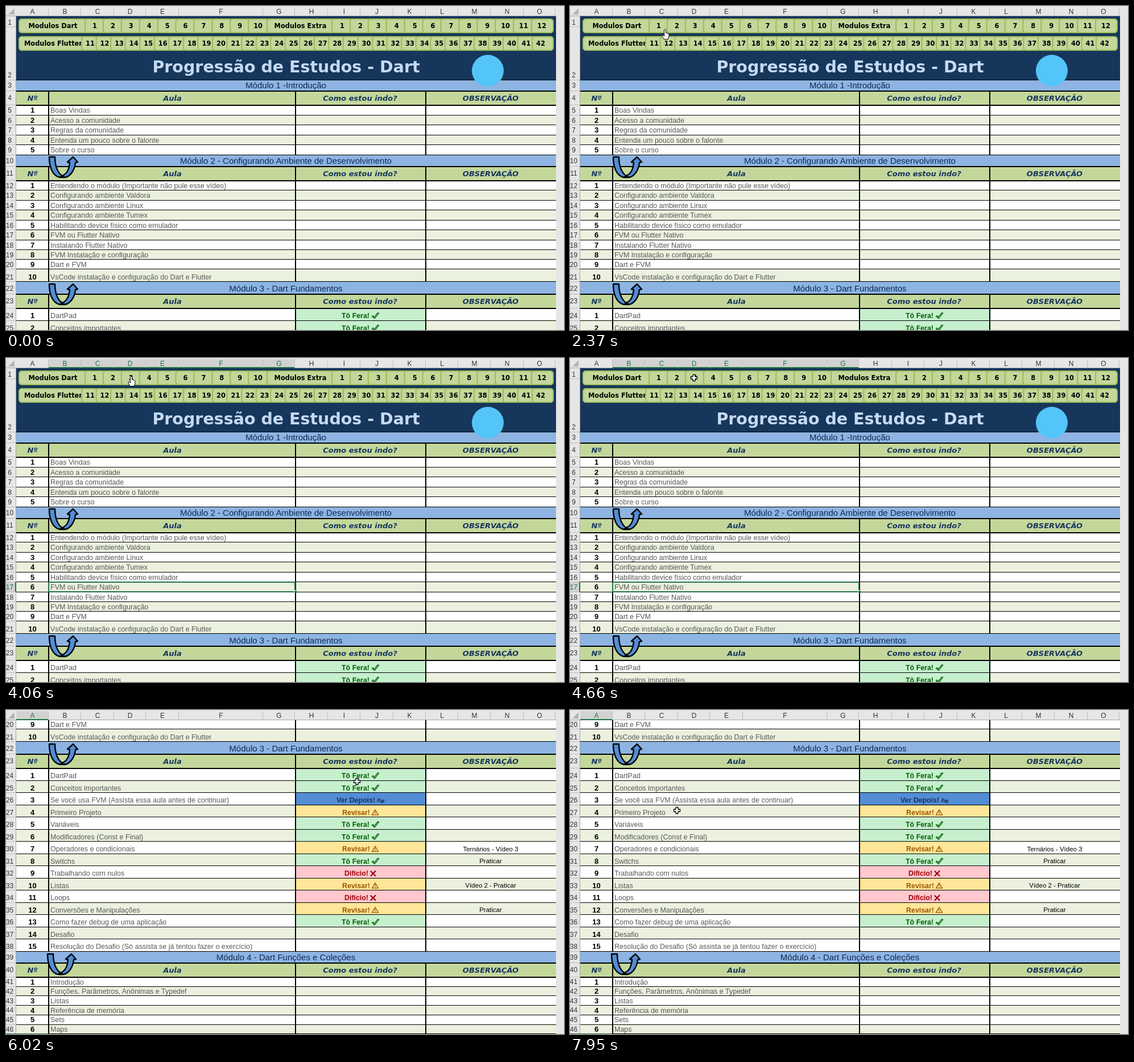
An HTML page for the animation above (8 s loop, 981 by 571 pixels).

```html
<!DOCTYPE html>
<html lang="pt-BR">
<head>
<meta charset="utf-8">
<style>
  html, body { margin: 0; width: 100%; height: 100%; overflow: hidden; background: #e6e6e6; }
  svg { display: block; }
  rect, line { shape-rendering: crispEdges; }
  text { font-family: "Liberation Sans", Arial, sans-serif; white-space: pre; }
  .mid { text-anchor: middle; }
  .label { font-size: 12px; fill: #333; }
  .on { fill: #217346; }
  .lesson { font-size: 12.5px; fill: #595959; }
  .num { font-size: 13px; font-weight: bold; }
  .note { font-size: 11.5px; }
  .module { font-size: 15px; fill: #0f2a52; }
  .head { font: italic bold 13px "DejaVu Sans", sans-serif; fill: #17365d; }
  .status { font-size: 12.4px; font-weight: bold; }
  .title { font: bold 28.5px "DejaVu Sans", sans-serif; fill: #c5d9f1; }
  .nav { font: bold 11.4px "DejaVu Sans", sans-serif; }
  .btn { fill: #c4d79b; stroke: #9bbb59; stroke-width: 2; shape-rendering: auto; }
</style>
</head>
<body>
<svg id="stage" width="981" height="571" viewBox="0 0 981 571"></svg>
<script>
const LEFT = 18, RIGHT = 967, SCROLL = 430, LOOP = 8000;
const COLS = [18, 75, 132, 190, 246, 304, 452, 508, 566, 623, 681, 738, 795, 852, 910, 966];

// Status: label, background, ink, label centre, icon x, icon path
const STATUS = {
  ok: ["Tô Fera!", "#c6efce", "#006100", 614.5, 643, "M.5 1L2.5 0L4.5 2.5L10.5-5L12.5-4.5L5 5z"],
  later: ["Ver Depois!", "#538dd5", "#17365d", 615, 653, "M0-2h4l-4 4h4M5 0h3l-3 3h3M8 0h4l-4 4h4"],
  review: ["Revisar!", "#ffe699", "#9c5700", 615.5, 643, "M6-4.5L11.5 4.5H.5zM6-1.5v3M6 2.5v1"],
  hard: ["Difício!", "#ffc7ce", "#9c0006", 616, 640, "M1-4l9 9M10-4.5l-9 9.5"]
};

const MODULES = [
  { title: "Módulo 1 -Introdução", top: 19, head: 25, row: () => 17.5, items: [
    "Boas Vindas", "Acesso a comunidade", "Regras da comunidade",
    "Entenda um pouco sobre o falonte", "Sobre o curso"] },
  { title: "Módulo 2 - Configurando Ambiente de Desenvolvimento", top: 20, head: 25,
    row: i => i < 7 ? 17.5 : i < 9 ? 17 : 22, items: [
    "Entendendo o módulo (Importante não pule esse vídeo)", "Configurando ambiente Valdora",
    "Configurando ambiente Linux", "Configurando ambiente Tumex",
    "Habilitando device físico como emulador", "FVM ou Flutter Nativo", "Instalando Flutter Nativo",
    "FVM Instalação e configuração", "Dart e FVM",
    "VsCode instalação e configuração do Dart e Flutter"] },
  { title: "Módulo 3 - Dart Fundamentos", top: 22, head: 25, row: () => 21.5, items: [
    "DartPad|ok", "Conceitos importantes|ok",
    "Se você usa FVM (Assista essa aula antes de continuar)|later", "Primeiro Projeto|review",
    "Variáveis|ok", "Modificadores (Const e Final)|ok",
    "Operadores e condicionais|review|Ternários - Vídeo 3", "Switchs|ok|Praticar",
    "Trabalhando com nulos|hard", "Listas|review|Vídeo 2 - Praticar", "Loops|hard",
    "Conversões e Manipulações|review|Praticar", "Como fazer debug de uma aplicação|ok", "Desafio",
    "Resolução do Desafio (Só assista se já tentou fazer o exercício)"] },
  { title: "Módulo 4 - Dart Funções e Coleções", top: 20.5, head: 25, row: () => 16.7, items: [
    "Introdução", "Funções, Parâmetros, Anônimas e Typedef", "Listas", "Referência de memória",
    "Sets", "Maps"] }
];

const rect = (x, y, w, h, fill) => `<rect x="${x}" y="${y}" width="${w}" height="${h}" fill="${fill}"/>`;
// y is the middle of the letters
const text = (x, y, cls, str, extra = "") =>
  `<text x="${x}" y="${y}" dy=".36em" class="${cls}" ${extra}>${str}</text>`;
const button = (x, y, w, cx, str) =>
  `<rect class="btn" x="${x}" y="${y}" width="${w}" height="24" rx="5"/>` + text(cx, y + 12, "nav mid", str);

let rowNo = 0;
function rowLabel(top, bottom, y) {
  return rect(0, bottom - 1, LEFT, 1, "#bfbfbf") + text(6.5, y, "label mid", ++rowNo);
}
const uprights = (y, h) => [74, 508, 737].map(x => rect(x, y, 2, h, "#000")).join("");

function banner() {
  let s = rect(LEFT, 18, RIGHT - LEFT, 112, "#16365c");
  s += rowLabel(18, 37, 29) + rowLabel(37, 131, 122);
  for (const y of [23, 54]) s += `<rect class="btn" x="23" y="${y}" width="939" height="24" rx="5"/>`;
  s += button(23, 23, 118, 82.5, "Modulos Dart");
  for (let i = 0; i < 10; i++) s += button(139 + 31.9 * i, 23, 34, 156 + 31.9 * i, i + 1);
  s += button(459, 23, 117, 517.5, "Modulos Extra");
  for (let i = 0; i < 12; i++) s += button(573 + 31.9 * i, 23, i < 11 ? 34 : 38, 591 + 31.9 * i, i + 1);
  s += button(23, 54, 113, 83, "Modulos Flutter");
  for (let i = 0; i < 32; i++) s += button(133 + 25.55 * i, 54, i < 31 ? 28 : 37, 148 + 25.55 * i, i + 11);
  return s + text(492.5, 107, "title mid", "Progressão de Estudos - Dart");
}

function moduleRows(m, start) {
  let y = start, s = "";
  const next = h => { const top = Math.round(y); y += h; return [top, Math.round(y)]; };
  const band = (top, bottom, fill) => rect(LEFT, top, RIGHT - LEFT, bottom - top, fill);

  let [top, bottom] = next(m.top);
  s += band(top, bottom, "#8db4e2") + rect(LEFT, top - 1, RIGHT - LEFT, 1, "#000");
  s += rowLabel(top, bottom, bottom - 10) + text(492, bottom - 10, "module mid", m.title);

  [top, bottom] = next(m.head);
  const mid = bottom - 13;
  s += band(top, bottom, "#c4d79b") + rowLabel(top, bottom, mid);
  [["Nº", 46.5], ["Aula", 292.5], ["Como estou indo?", 622.5], ["OBSERVAÇÃO", 852]]
    .forEach(([str, x]) => s += text(x, mid, "head mid", str));
  s += rect(LEFT, top - 1, RIGHT - LEFT, 2, "#000") + rect(LEFT, bottom - 1, RIGHT - LEFT, 2, "#000");
  s += uprights(top, bottom - top);

  m.items.forEach((item, i) => {
    const [name, state, note] = item.split("|");
    [top, bottom] = next(m.row(i));
    const ty = y - 8.7, fillTop = top + (i ? 0 : 1);
    s += rect(LEFT, fillTop, RIGHT - LEFT, bottom - fillTop, i % 2 ? "#ebf1de" : "#fff");
    s += rowLabel(top, bottom, ty) + text(46.5, ty, "num mid", i + 1) + text(78, ty, "lesson", name);
    if (state) {
      const [label, fill, ink, cx, ix, icon] = STATUS[state];
      s += rect(510, fillTop, 227, bottom - fillTop, fill) + text(cx, ty, "status mid", label, `fill="${ink}"`);
      s += `<path d="${icon}" transform="translate(${ix} ${ty})" fill="none" stroke="${ink}"
        stroke-width="${state === "hard" ? 2.2 : 1.3}"/>`;
    }
    if (note) s += text(852, ty, "note mid", note);
    s += rect(LEFT, bottom - 1, RIGHT - LEFT, 1, "#000") + uprights(top, bottom - top);
  });
  return [s, y];
}

function columnHeads(from, to) {
  let s = rect(0, 0, 981, 18, "#e6e6e6") + rect(0, 17, RIGHT, 1, "#a6a6a6");
  s += `<path d="M15 4V15H4z" fill="#b4b4b4"/>`;
  for (let i = 0; i < 15; i++) {
    const x = COLS[i], w = COLS[i + 1] - x, on = i >= from && i <= to;
    if (on) s += rect(x, 2, w, 15, "#d2d2d2") + rect(x, 16, w, 2, "#217346");
    s += rect(x + w - 1, 2, 1, 15, "#bfbfbf");
    s += text(x + w / 2, 10, "label mid" + (on ? " on" : ""), "ABCDEFGHIJKLMNO"[i]);
  }
  return s;
}

const uturn = (id, dx, dy) => `<path id="${id}" transform="translate(${dx} ${dy})" fill="#538dd5" stroke="#000"
  stroke-width="2.4" stroke-linejoin="round" d="M95 302H104C114 300 121 288 122 276L126 275L118 266L108 275
  L112 276C111 288 107 296 99 299zM76 266H86C86 284 92 298 104 302H95C82 300 76 284 76 266z"/>`;

let sheet = rect(0, 18, LEFT, 1000, "#e6e6e6") + banner(), y = 131;
for (const m of MODULES) {
  const [rows, end] = moduleRows(m, y);
  sheet += rows;
  y = end;
}
sheet += rect(LEFT - 1, 18, 1, 1000, "#a6a6a6");
sheet += `<circle cx="847" cy="114" r="28" fill="#54c5f8"/>`;
sheet += uturn("turn2", 0, 0) + uturn("turn3", 0, 224) + uturn("turn4", -3, 594);
sheet += `<g id="picked">${rect(0, 395, 17, 17, "#d2d2d2")}${rect(16, 395, 2, 17, "#217346")}
  ${text(6.5, 403.8, "label mid on", 17)}
  <rect x="75" y="395" width="433" height="17" fill="none" stroke="#217346" stroke-width="2"/>
  ${rect(506, 409, 5, 5, "#fff")}${rect(507, 410, 4, 4, "#217346")}</g>`;
sheet += rect(0, 1000, 75, 2, "#217346");

document.getElementById("stage").innerHTML = `<g id="sheet">${sheet}</g>
  <g id="heads0">${columnHeads(-1, -1)}</g>
  <g id="heads1">${columnHeads(1, 6)}</g>
  <g id="heads2">${columnHeads(0, 0)}</g>
  <g id="cursor" fill="#fff" stroke="#000" stroke-linejoin="round">
    <path id="cross" stroke-width="1.3" d="M-2-5.5h4v3.5h3.5v4h-3.5v3.5h-4v-3.5h-3.5v-4h3.5z"/>
    <path id="arrow" d="M0 0V14L3.3 11L5.7 16.5L8 15.5L5.7 10H10z"/>
    <path id="hand" d="M-1.5 1Q0-1 1.5 1V6L6 7.5Q7 8 7 10V13L5 17.5H-2L-5 12Q-5.5 9.5-3.5 10L-1.5 12z"/>
  </g>`;

// Pointer stops: time, x, y
const PATH = [
  [120, 904, 565], [320, 699, 348], [520, 693, 345], [1280, 211, 137], [1350, 194, 122],
  [1800, 149, 62], [2100, 155, 43], [2170, 156, 43], [2930, 220, 32], [4460, 220, 32],
  [4461, 218, 35], [5250, 218, 35], [5700, 520, 138], [6020, 617, 126], [6100, 620, 125],
  [6280, 691, 118], [6840, 269, 110], [6980, 225, 106], [7380, 121, 132], [7680, 143, 152],
  [7950, 188, 177], [LOOP, 188, 177]
];

function pointer(t) {
  const i = Math.max(1, PATH.findIndex(p => p[0] > t));
  const [t0, x0, y0] = PATH[i - 1], [t1, x1, y1] = PATH[i];
  const u = Math.max(0, (t - t0) / (t1 - t0)), k = u * u * (3 - 2 * u);
  return [x0 + (x1 - x0) * k, y0 + (y1 - y0) * k];
}

const $ = id => document.getElementById(id);
const show = (id, on) => $(id).setAttribute("visibility", on ? "visible" : "hidden");

function draw(t) {
  const scrolled = t >= 4730, picked = t >= 3200 && !scrolled;
  $("sheet").setAttribute("transform", `translate(0 ${scrolled ? -SCROLL : 0})`);
  show("picked", picked);
  show("turn4", t >= 4860);
  show("heads0", t < 3200);
  show("heads1", picked);
  show("heads2", scrolled);

  const [x, y] = pointer(t);
  const kind = t >= 4460 || y > 131 ? "cross" : y > 79 ? "arrow" : "hand";
  $("cursor").setAttribute("transform", `translate(${x.toFixed(1)} ${y.toFixed(1)})`);
  for (const id of ["cross", "arrow", "hand"]) show(id, t >= 120 && id === kind);
}

const begin = performance.now();
function tick() {
  draw((performance.now() - begin) % LOOP);
  requestAnimationFrame(tick);
}
tick();
</script>
</body>
</html>
```
